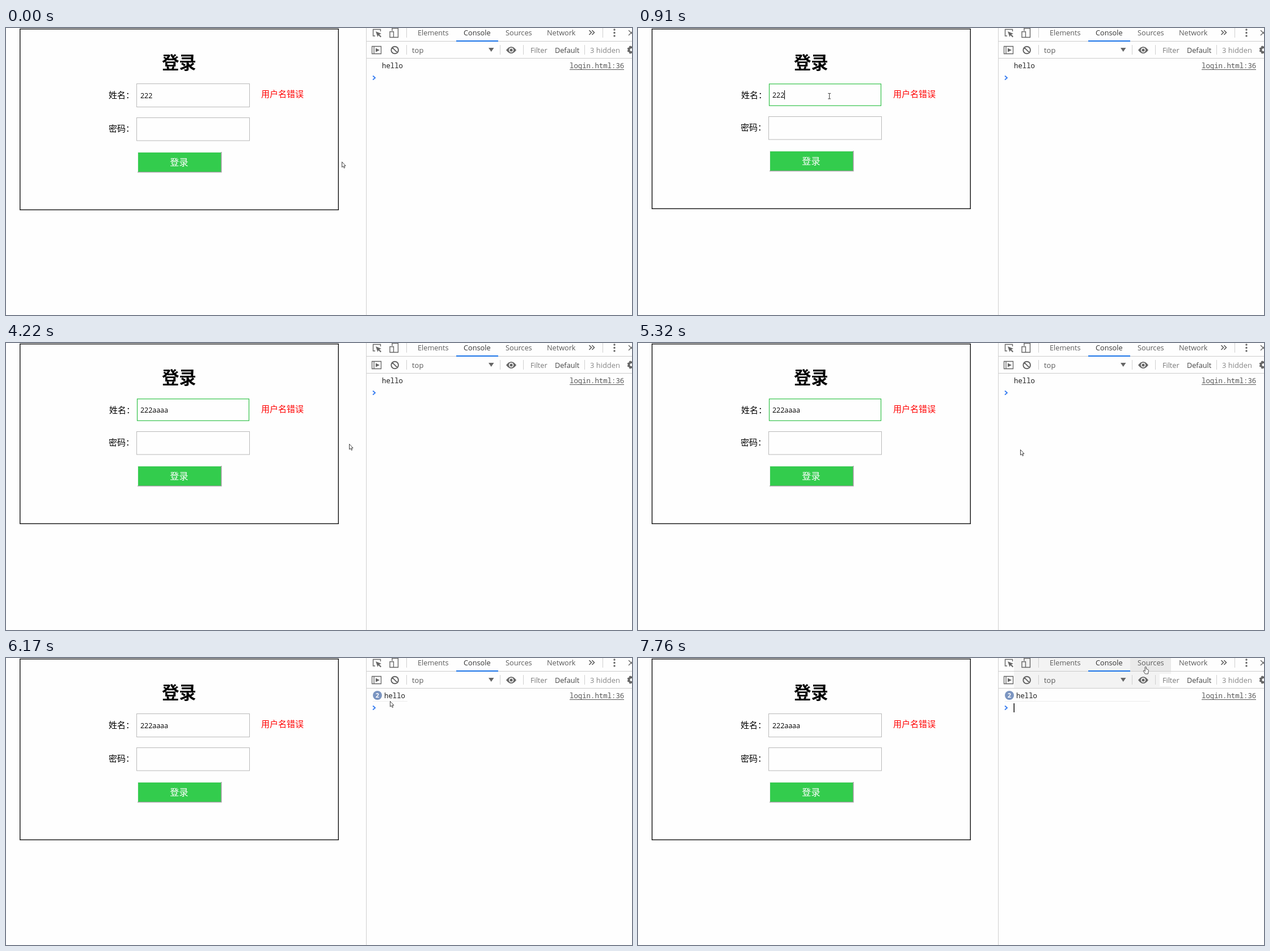
These frames come from a looping animation (1104 px wide and 507 px high, 8000 ms). An HTML page with a canvas:

```html
<!DOCTYPE html>
<html lang="zh-CN">
<head>
<meta charset="utf-8">
<style>
html, body { margin: 0; width: 100%; height: 100%; overflow: hidden; background: #fefefe; }
canvas { display: block; }
</style>
</head>
<body>
<canvas id="stage" width="1104" height="507"></canvas>
<script>
const ctx = document.getElementById('stage').getContext('2d');
const LOOP = 8000, FOCUS = 910, TYPE = 3125, TYPED = 3685, BLUR = 5640, LEAVE = 7220, TAB = 7740;
const KEY_GAP = 140, BLINK = 526, TICK = 130;
const CJK = '"Noto Sans CJK SC", "Noto Sans CJK", sans-serif';
const UI = '"Open Sans", "Noto Sans", sans-serif';
const MONO = '"Noto Sans Mono", monospace';
const PAPER = '#fefefe', GRAY = '#666', LINE = '#d0d0d0';

// Pointer moves: start, end, and where it comes to rest
const home = { x: 592, y: 236 };
const moves = [
  { from: 0, to: 630, x: 337, y: 120 },
  { from: 3820, to: 4220, x: 605, y: 178 },
  { from: 4220, to: 4610, x: 687, y: 195 },
  { from: 5040, to: 5320, x: 674, y: 188 },
  { from: BLUR, to: 6170, x: 677, y: 76 },
  { from: 6170, to: 6560, x: 656, y: 82 },
  { from: 6700, to: LEAVE, x: 813, y: 45 },
  { from: LEAVE, to: TAB, x: 895, y: 15 }
];

const clamp = (v, lo, hi) => Math.min(hi, Math.max(lo, v));
const smooth = u => u * u * (3 - 2 * u);
const blinkOn = (t, since) => Math.floor((t - since) / BLINK) % 2 === 0;

// Each move is eased and shown in steps of about one tick
function pointerAt(t) {
  let { x, y } = home;
  for (const m of moves) {
    const steps = Math.round((m.to - m.from) / TICK);
    const u = clamp((t - m.from) / (m.to - m.from), 0, 1);
    const k = smooth(Math.floor(u * steps) / steps);
    x += (m.x - x) * k;
    y += (m.y - y) * k;
  }
  return { x: Math.round(x), y: Math.round(y) };
}

function rect(x, y, w, h, color) {
  ctx.fillStyle = color;
  ctx.fillRect(x, y, w, h);
}
function box(x, y, w, h, color, width = 1) {
  ctx.strokeStyle = color;
  ctx.lineWidth = width;
  ctx.strokeRect(x, y, w, h);
}
function text(s, x, y, size, color, family = UI, weight = 400) {
  ctx.font = `${weight} ${size}px ${family}`;
  ctx.fillStyle = color;
  ctx.fillText(s, x, y);
}
function outline(d, color = GRAY, width = 1.4) {
  ctx.strokeStyle = color;
  ctx.lineWidth = width;
  ctx.stroke(new Path2D(d));
}
function shape(d, color = GRAY) {
  ctx.fillStyle = color;
  ctx.fill(new Path2D(d));
}
function disc(x, y, r, color = GRAY) {
  ctx.fillStyle = color;
  ctx.beginPath();
  ctx.arc(x, y, r, 0, 2 * Math.PI);
  ctx.fill();
}

function drawForm(t) {
  const focused = t >= FOCUS && t < BLUR;
  const up = focused ? 2 : 0;
  box(24.75, 1.7, 561.5, 319.5 - up, '#111', 1.4);
  text('登录', 275, 71.7, 30.2, '#000', CJK, 700);
  text('姓名：', focused ? 182 : 181, 123.5, 15, '#000', CJK);
  text('用户名错误', 450, 121.5, 15, '#f00', CJK);
  if (focused) box(231.5, 98.8, 197, 38.4, '#33c24a', 1.2);
  else box(230.5, 98.5, 199, 41, '#b9b9b9');

  const typed = clamp(Math.floor((t - TYPE) / KEY_GAP), 0, 4);
  const value = '222' + 'a'.repeat(typed);
  text(value, 237, focused ? 123 : 124, 12.4, '#000', UI, 500);
  if (focused && blinkOn(t, t < TYPED ? FOCUS : TYPED))
    rect(Math.round(237 + ctx.measureText(value).width), 110, 1, 16, '#000');

  text('密码：', 181, 183.3 - up, 15, '#000', CJK);
  box(230.5, 158.5 - up, 199, 40.5, '#b9b9b9');
  rect(232, 219 - up, 148.5, 36.3, '#a0a0a0');
  rect(232, 219 - up, 147, 35, '#eef1ee');
  rect(233, 220 - up, 146, 34, '#33cc4d');
  text('登录', 289, 242.8 - up, 16.2, '#fff', CJK, 500);
}

// Shading that appears along the pointer's way
function drawHover(t, pointer) {
  if (t >= TAB) {
    rect(663, 0, 277, 53, '#f3f3f3');
    rect(868, 0, 72, 23, '#eaeaea');
    rect(920, 28, 20, 22, PAPER);
  } else if (t >= LEAVE) {
    rect(762, 45, pointer.x - 762, 8, '#f1f1f1');
  }
  if (t >= BLUR) rect(647, 76, Math.max(61, pointer.x - 639), 1, '#ececec');
}

function drawToolbars() {
  rect(635, 0, 1, 507, LINE);
  for (const y of [23, 53]) rect(636, y, 468, 1, '#ccc');
  rect(794, 22, 74, 2, '#1a73e8');
  for (const x of [706, 1052]) rect(x, 0, 1, 17, LINE);
  for (const x of [706, 871, 912, 1020]) rect(x, 30, 1, 17, LINE);

  text('Elements', 726, 13, 12.7, '#5a5a5a');
  text('Console', 807, 13, 12.7, '#333');
  text('Sources', 881, 13, 12.7, '#5a5a5a');
  text('Network', 954, 13, 12.7, '#5a5a5a');
  text('top', 716, 43.5, 13, '#5a5a5a');
  text('Filter', 925, 43.5, 12.6, '#777');
  text('Default', 968, 43.5, 12.7, '#444');
  text('3 hidden', 1030, 43.5, 12.9, '#888');

  // Inspect, device, overflow, menu, close
  outline('M651 14H647.5V2.5H660.5V6');
  shape('M652 6L662 10L658.3 11.3L662 15L660.5 16.5L656.8 12.8L655.5 16Z');
  outline('M681 5V0.5H691.5V16.5H684M677 6.5H683.5V16.5H677Z');
  outline('M1028.5 4l4 4l-4 4M1033.5 4l4 4l-4 4', '#555', 1.5);
  for (let i = 0; i < 3; i++) disc(1073, 3 + 5.5 * i, 1.7);
  outline('M1098 4l9 9m0 -9l-9 9');

  // Sidebar, clear, context menu, eye, gear
  outline('M645.5 32.5h16v13h-16ZM649 32v14', GRAY, 1.3);
  shape('M652 35.5l7 3.5l-7 3.5Z');
  outline('M692 39a6.3 6.3 0 1 1 -12.6 0a6.3 6.3 0 1 1 12.6 0M681.3 34.6l8.8 8.8', GRAY, 2);
  shape('M851 35h9.5l-4.8 7Z');
  shape('M882 39Q891 27 900 39Q891 51 882 39Z');
  disc(891, 39, 4.2, PAPER);
  disc(891, 39, 2.6);
  for (let i = 0; i < 8; i++) {
    const a = (i + 0.5) * Math.PI / 4;
    disc(1103 + 5.5 * Math.cos(a), 38.5 + 5.5 * Math.sin(a), 2);
  }
  disc(1103, 38.5, 5.8);
  disc(1103, 38.5, 2.6, PAPER);
}

function drawConsole(t) {
  const repeated = t >= BLUR;
  if (repeated) {
    disc(655, 66, 8, '#7b95c1');
    text('2', 651.8, 70, 11, '#fff', UI, 700);
  }
  text('hello', repeated ? 667 : 663, 71, 12.35, '#222', MONO);
  text('login.html:36', 994, 71, 12.35, '#555', MONO);
  rect(994, 73, 96, 1, '#555');
  outline('M647 84.5l4 3.5l-4 3.5', '#367cf1', 1.8);
  if (repeated && blinkOn(t, BLUR)) rect(662.5, 80, 1.4, 16, '#000');
}

function drawPointer({ x, y }) {
  const inField = x > 230 && x < 430 && y > 98 && y < 139;
  const hand = 'M-0.8 7V1Q0.4 -0.8 1.4 1V4.5L4.5 5.3Q5.6 6 5.2 8.5L4.4 13H-0.5L-3.7 8.3Q-3.8 6.5 -2.2 7.2L-0.8 8.6Z';
  const arrow = 'M0.5 0.5V10L2.7 8L4.2 11.5L5.7 10.8L4.3 7.5H7Z';
  ctx.save();
  ctx.translate(x, y);
  if (inField) {
    outline('M-2 -4.5H0.5M1 -4.5H3M0.5 -4.5V5M-2 5H3', '#444', 1);
  } else {
    const d = y < 23 ? hand : arrow;
    shape(d, '#fff');
    outline(d, '#444', 1);
  }
  ctx.restore();
}

function draw() {
  const t = performance.now() % LOOP;
  const pointer = pointerAt(t);
  rect(0, 0, 1104, 507, PAPER);
  drawForm(t);
  drawHover(t, pointer);
  drawToolbars();
  drawConsole(t);
  drawPointer(pointer);
  requestAnimationFrame(draw);
}
draw();
</script>
</body>
</html>
```
